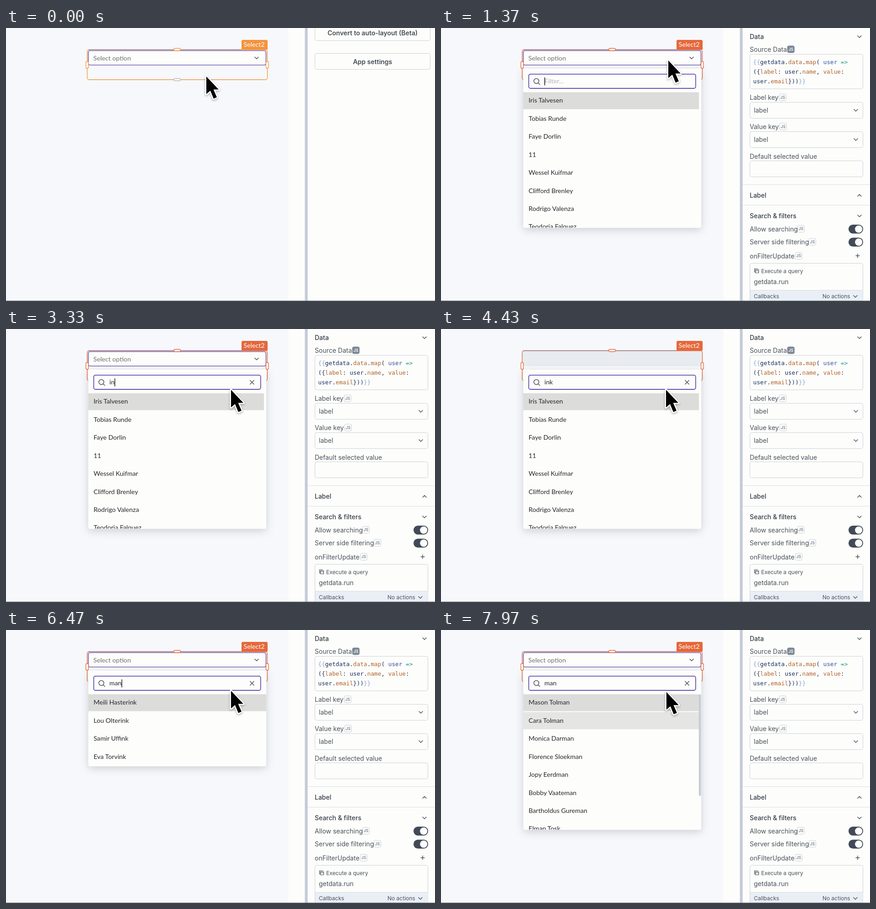
An HTML page for the animation above (8000 ms loop, 938 by 597 pixels).

```html
<!DOCTYPE html>
<html lang="en">
<head>
<meta charset="utf-8">
<title>Select with server side filtering</title>
<style>
  html, body { margin: 0; width: 100%; height: 100%; overflow: hidden; background: #fdfdfb; }
  svg { display: block; width: 938px; height: 597px; }
  text { font: 14px Inter, sans-serif; fill: #4a525c; white-space: pre; }
  .canvas text { font: 14.2px Lato, sans-serif; fill: #25272b; }
  .canvas .muted { fill: #717175; }
  .canvas .faint { fill: #b3b3b8; }
  .canvas .tag { fill: #fff; }
  .head { font-weight: 500; fill: #363e49; }
  .button { font-weight: 600; text-anchor: middle; fill: #454b54; }
  .small { font-size: 12px; }
  .code text { font: 12.73px "DejaVu Sans Mono", monospace; fill: #16305f; }
  .brace { fill: #8ea6d0; }
  .prop { fill: #b0642c; }
  .param { fill: #3450a0; }
  .arrow { fill: #159a80; }
  .badge { font-size: 8.5px; font-weight: 600; text-anchor: middle; fill: #7a8694; }
  .box { fill: #fdfdfb; stroke: #cbd1dc; }
  .line { fill: none; stroke: #4c5561; stroke-width: 1.5; stroke-linecap: round; stroke-linejoin: round; }
  .rule { stroke: #d8dde9; }
  .shadow { filter: drop-shadow(0 5px 9px rgba(30, 40, 60, .19)); }
  #outline, .handle { stroke: var(--accent); }
  .handle { fill: #fffdf8; stroke-width: 1.3; }
  #tag { fill: var(--accent); }
</style>
</head>
<body>
<svg viewBox="0 0 938 597">
  <defs>
    <clipPath id="listClip"><rect x="180" y="89" width="389" height="347.5" rx="4"/></clipPath>
  </defs>
  <rect width="938" height="597" fill="#fdfdfb"/>
  <rect width="617.5" height="597" fill="#f7f8fb"/>
  <rect x="653.5" width="6" height="597" fill="#c4cad9"/>

  <g id="appPanel">
    <rect class="box" x="675.5" y="-8.5" width="252" height="36" rx="4"/>
    <text class="button" x="801.5" y="16">Convert to auto-layout (Beta)</text>
    <rect class="box" x="675.5" y="55.5" width="252" height="35" rx="4"/>
    <text class="button" x="801.5" y="79">App settings</text>
  </g>
  <g id="propPanel"></g>

  <g class="canvas" id="canvas">
    <g id="control">
      <rect x="180" y="49.5" width="388.5" height="31.5" rx="4" fill="#fdfdfb" stroke="#7564b5" stroke-width="1.7"/>
      <text class="muted" x="191" y="70.5">Select option</text>
      <path class="line" d="M544 63.5l4 4 4-4" stroke="#777"/>
    </g>
    <rect id="skeleton" x="178" y="48" width="393" height="33" rx="3" fill="#dbe2e8"/>
    <rect id="outline" x="177.5" y="47.5" width="394" height="65.5" rx="4" fill="none" stroke-width="1.3"/>
    <path id="topLine" d="M180 47.3H514" stroke="#77739a"/>
    <rect class="handle" x="367" y="44.5" width="14.5" height="5" rx="2.5"/>
    <rect class="handle" x="367" y="110.5" width="14.5" height="5" rx="2.5" style="stroke:#b4b4cd"/>
    <rect class="handle" x="174.7" y="73.5" width="5.5" height="14.5" rx="2"/>
    <rect class="handle" x="568.5" y="73.5" width="5.5" height="14.5" rx="2"/>
    <path id="tag" d="M515 47V29q0-3 3-3h51q3 0 3 3v18z"/>
    <text class="tag" x="519.5" y="41">Select2</text>

    <g id="popover">
      <rect id="sheet" class="shadow" x="180" y="89" width="389" height="348" rx="4" fill="#fdfdfb"/>
      <rect id="active" x="180" y="140.5" width="384" height="37" fill="#dcdcda"/>
      <rect id="hover" x="180" y="179.5" width="384" height="37.5" fill="#e5e5e3"/>
      <g id="lists" clip-path="url(#listClip)"></g>
      <rect id="scrollbar" x="563.8" y="141" width="4.7" height="221.5" rx="1" fill="#c4cdd8"/>
      <rect x="191.8" y="100.8" width="365" height="31.2" rx="4" fill="#fdfdfb" stroke="#6552b4" stroke-width="1.8"/>
      <path class="line" d="M212.5 120l3.5 3.5M214 116a5.5 5.5 0 1 1-11 0a5.5 5.5 0 1 1 11 0" stroke="#666"/>
      <text id="query" x="226" y="120.8"></text>
      <path id="caret" d="M0 108v17.5" stroke="#111" stroke-width="1.4"/>
      <path id="clear" class="line" d="M533.8 112.3l8.4 8.4m0-8.4l-8.4 8.4"/>
    </g>
  </g>

  <rect y="596" width="938" height="1" fill="#85858a"/>
  <path id="cursor" d="M0 0V38.5L8.7 31 16 48.5 23 45.5 15.6 28.5H27Z" fill="#000" stroke="#fff" stroke-width="5"
        stroke-linejoin="round" paint-order="stroke" style="filter:drop-shadow(0 2px 2px rgba(0,0,0,.3))"/>
</svg>
<script>
const LOOP = 8000;
const $ = id => document.getElementById(id);

// Property panel
const label = (x, y, s, cls = '') => `<text x="${x}" y="${y}" class="${cls}">${s}</text>`;
const box = (y, h) => `<rect class="box" x="675.5" y="${y}" width="247" height="${h}" rx="4"/>`;
const rule = y => `<path class="rule" d="M660 ${y}H938"/>`;
const chevron = (x, y, dir = 1) => `<path class="line" d="M${x - 4} ${y - 2 * dir}l4 ${4 * dir} 4 ${-4 * dir}"/>`;
const badge = (x, y, on) =>
  `<rect x="${x}" y="${y}" width="15" height="15" rx="3" fill="${on ? '#7d8896' : '#fdfdfb'}" stroke="${on ? '#7d8896' : '#c6ced9'}"/>
   <text class="badge" x="${x + 7.5}" y="${y + 10.8}" ${on ? 'style="fill:#fff"' : ''}>JS</text>`;
const toggle = y =>
  `<rect x="891" y="${y}" width="32" height="19.5" rx="9.7" fill="#414a57"/><circle cx="913.2" cy="${y + 9.75}" r="8" fill="#fdfdfb"/>`;
const span = (cls, s) => `<tspan class="${cls}">${s}</tspan>`;

$('propPanel').innerHTML = [
  label(675, 23.5, 'Data', 'head'), chevron(915, 19),
  label(675, 52, 'Source Data'), badge(757.5, 39, true), box(57.5, 75.5),
  '<g class="code">',
  label(682.5, 79, span('brace', '{{') + 'getdata.' + span('prop', 'data') + '.' + span('prop', 'map') + '( ' + span('param', 'user') + ' ' + span('arrow', '=&gt;')),
  label(682.5, 100, '({' + span('prop', 'label') + ': user.' + span('prop', 'name') + ', ' + span('prop', 'value') + ':'),
  label(682.5, 120.5, 'user.' + span('prop', 'email') + '}))' + span('brace', '}}')),
  '</g>',
  label(675, 157, 'Label key'), badge(739.5, 144), box(162.5, 35), label(684, 185, 'label'), chevron(907, 180),
  label(675, 221, 'Value key'), badge(740.5, 208), box(226.5, 35), label(684, 249, 'label'), chevron(907, 244),
  label(675, 285.5, 'Default selected value'), box(290.5, 35),
  rule(342.5), label(675, 370.5, 'Label', 'head'), chevron(915, 366, -1), rule(387.5),
  label(675, 416, 'Search &amp; filters', 'head'), chevron(915, 411),
  label(675, 445, 'Allow searching'), badge(779.5, 431.5), toggle(430),
  label(675, 473, 'Server side filtering'), badge(804.5, 460), toggle(458.5),
  label(675, 504, 'onFilterUpdate'), badge(774.5, 490.5),
  '<path class="line" d="M907 498h8m-4-4v8"/>',
  box(514.5, 100), '<rect x="676" y="573" width="246.5" height="24" fill="#e9eff5"/><path class="rule" d="M676 573.5H922"/>',
  '<path class="line" style="stroke-width:1.2" d="M685.5 533.5v-7h7M687.5 528.5h7v7h-7zM687.5 531h7M685.5 533.5h2"/>',
  label(700, 535.5, 'Execute a query', 'small'), label(684, 560, 'getdata.run'),
  label(684, 591, 'Callbacks', 'small'), label(834, 591, 'No actions', 'small'), chevron(906, 587)
].join('');

// Dropdown lists, one per search result
const lists = [
  ['Iris Talvesen', 'Tobias Runde', 'Faye Dorlin', '11', 'Wessel Kuifmar', 'Clifford Brenley', 'Rodrigo Valenza', 'Teodoria Falquez'],
  ['Meili Hasterink', 'Lou Olterink', 'Samir Uffink', 'Eva Torvink'],
  ['Mason Tolman', 'Cara Tolman', 'Monica Darman', 'Florence Sloekman', 'Jopy Eerdman', 'Bobby Vaateman', 'Bartholdus Gureman', 'Elman Tosk']
];
$('lists').innerHTML = lists.map(rows =>
  `<g>${rows.map((name, i) => label(191.5, 163.3 + 39.45 * i, name)).join('')}</g>`).join('');

// Timeline
const CLICK = 780, OPEN = 900;
const loading = [[4050, 4850], [6900, 7500]];
const results = [[0, 0], [4850, 1], [7500, 2]];
const typed = [[OPEN, ''], [3000, 'i'], [3150, 'in'], [3500, 'ink'],
  [5500, 'in'], [5620, 'i'], [5740, ''], [6050, 'm'], [6200, 'ma'], [6350, 'man']];
const path = [[100, 438, 106], [750, 497, 71], [1700, 497, 71], [2600, 572, 205],
  [2650, 572, 205], [3100, 492, 133], [7900, 492, 133], [8300, 502, 165]];

const latest = (steps, t) => steps.filter(s => s[0] <= t).pop() || steps[0];
const ramp = (t, from, to) => Math.min(1, Math.max(0, (t - from) / (to - from)));
const ease = p => p * p * (3 - 2 * p);
const show = (id, on) => $(id).style.display = on ? '' : 'none';

function cursorAt(t) {
  const i = Math.max(0, path.findLastIndex(k => k[0] <= t));
  const a = path[i], b = path[i + 1];
  const p = ease(ramp(t, a[0], b[0]));
  return [a[1] + (b[1] - a[1]) * p, a[2] + (b[2] - a[2]) * p];
}

function draw(t) {
  const selected = t >= CLICK;
  show('appPanel', !selected);
  show('propPanel', selected);
  $('canvas').style.setProperty('--accent', selected ? '#e5683b' : '#f4943f');

  const wait = loading.find(([from, to]) => t >= from && t < to);
  show('control', !wait);
  show('skeleton', wait);
  if (wait) $('skeleton').style.opacity = .6 - .2 * Math.cos((t - wait[0]) / 1000 * Math.PI);

  const shown = latest(results, t)[1];
  const long = shown !== 1;
  $('popover').style.opacity = ramp(t, OPEN, OPEN + 100);
  $('sheet').setAttribute('height', long ? 348 : 209);
  $('active').setAttribute('width', long ? 384 : 389);
  [...$('lists').children].forEach((g, i) => g.style.display = i === shown ? '' : 'none');
  show('hover', t >= 7920);
  $('scrollbar').style.opacity = t < 5000 ? ramp(t, 2150, 2250) * (1 - ramp(t, 2900, 3050)) : ramp(t, 7900, 7950);

  const [keyTime, value] = latest(typed, t);
  const query = $('query');
  query.textContent = value || 'Filter...';
  query.setAttribute('class', value ? '' : 'faint');
  show('clear', value);
  const caretX = 226.7 + (value ? query.getComputedTextLength() : 0);
  $('caret').setAttribute('transform', `translate(${caretX} 0)`);
  show('caret', (t - keyTime) % 1000 < 500);

  $('cursor').setAttribute('transform', `translate(${cursorAt(t)})`);
}

const start = performance.now();
(function tick() {
  draw((performance.now() - start) % LOOP);
  requestAnimationFrame(tick);
})();
</script>
</body>
</html>
```
